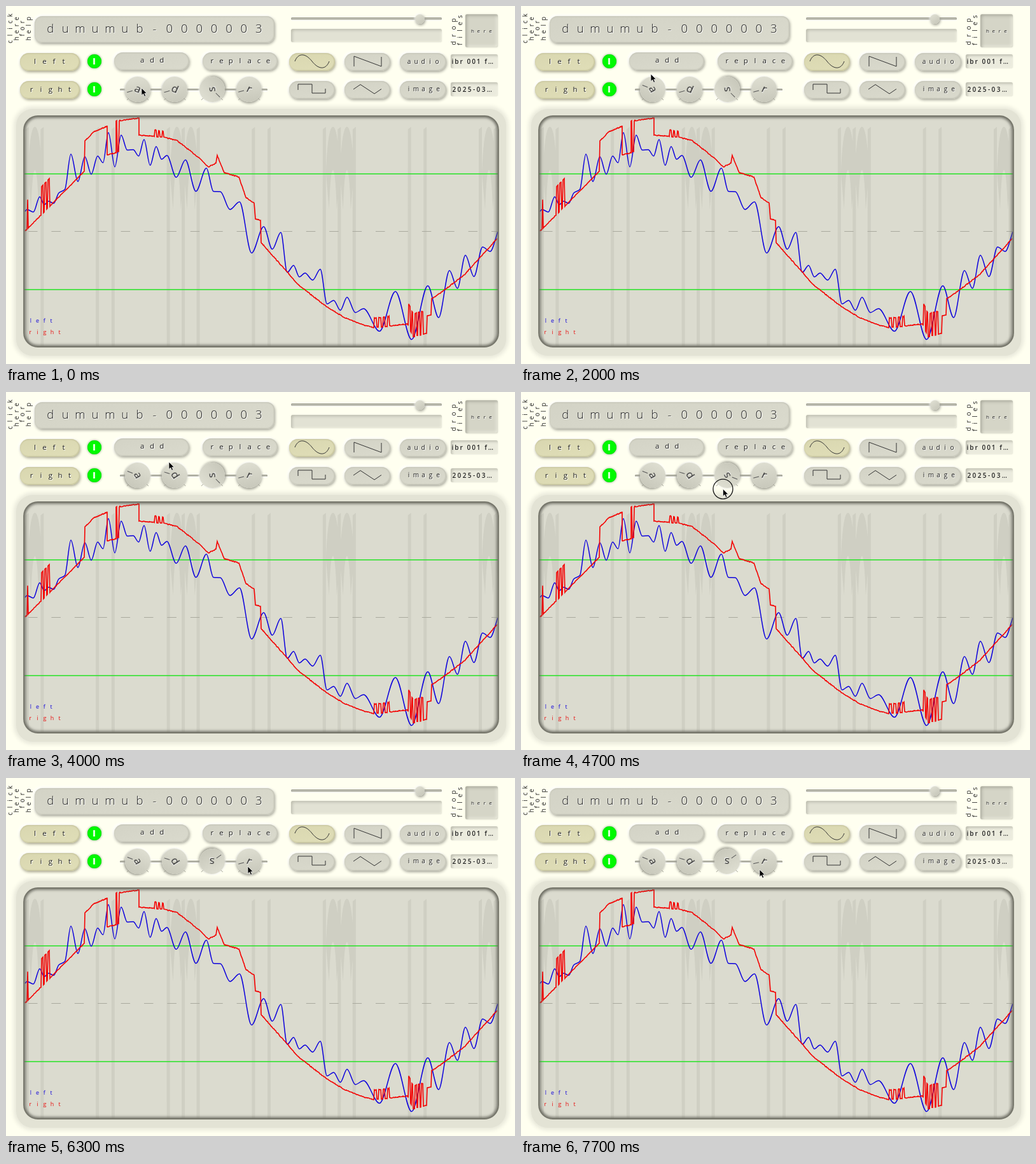
These frames come from a looping animation (800 px wide and 563 px high, 7.8 s). An HTML page:

```html
<!DOCTYPE html>
<html lang="en">
<head>
<meta charset="utf-8">
<title>Envelope panel</title>
<style>
html, body { margin: 0; width: 100%; height: 100%; overflow: hidden; background: #fffff0; }
#stage { position: relative; width: 800px; height: 563px; overflow: hidden; background: #fffff0; }
#stage div { position: absolute; box-sizing: border-box; }
svg { position: absolute; left: 0; top: 0; }
.pill { border-radius: 14px; background: linear-gradient(170deg, #d3d3c6, #dadacd);
  box-shadow: 1px 2px 4px #a5a599, -2px -2px 4px #fff, inset 0 1px 2px #c2c2b5, inset -1px -1px 2px #c0c0b3; }
.on { background: linear-gradient(170deg, #d9d7b0, #e0deb8);
  box-shadow: 1px 2px 4px #a8a68e, -2px -2px 4px #fff, inset 0 1px 2px #c4c19a, inset -1px -1px 2px #c2c099; }
.title { border-radius: 12px; }
.well { border-radius: 3px; background: #e2e2d4; box-shadow: inset 2px 2px 4px #bcbcae, inset -1px -1px 3px #f8f8e9, 0 0 3px #ecece0; }
.deep { background: #d5d5c7; box-shadow: inset 2px 2px 5px #a9a99c, inset -2px -2px 4px #f0f0e2, 0 0 3px #d8d8ca; }
.file { background: #ebebdd; }
.track { border-radius: 2px; background: #c5c5b8; box-shadow: inset 0 1px 2px #8f8f84, 0 1px 2px #fff; }
.thumb, .knob { border-radius: 50%; background: linear-gradient(145deg, #e2e2d5, #c4c4b7);
  box-shadow: 1px 2px 4px #96968b, -1px -1px 3px #fff; }
.led { border-radius: 50%; background: #00fa00; box-shadow: 0 0 3px 1px #bccdb2, inset 0 0 2px #0cc00c; }
.led::after { content: ""; position: absolute; left: 9.5px; top: 6px; width: 3px; height: 10px; background: #d8ffd8; }
.bezel { border-radius: 26px; background: #e3e3d5; box-shadow: 0 0 6px 4px #e9e9db; }
.scope { border-radius: 22px; background: #dbdbcf; }
text { font-family: "Open Sans", "Noto Sans", sans-serif; fill: #222; text-anchor: middle; }
.emboss { filter: drop-shadow(1px 1px .5px #fff); }
</style>
</head>
<body>
<div id="stage"></div>
<script>
const LOOP = 7800, STEP = 100;
const stage = document.getElementById('stage');

function box(cls, x, y, w, h) {
  const d = document.createElement('div');
  d.className = cls;
  d.style.cssText = `left:${x}px;top:${y}px;width:${w}px;height:${h}px`;
  stage.append(d);
  return d;
}

box('pill title', 45, 16, 377, 42);
for (const y of [74, 118]) {
  box('pill on', 22, y, 94, 28);
  box('led', 127.5, y + 2, 22, 22);
  for (let i = 0; i < 3; i++) box(y + i === 74 ? 'pill on' : 'pill', 444.5 + 87.3 * i, y, 72.5, 28);
  box('well file', 699, y + 2, 74, 22);
}
for (const x of [170, 308.5]) box('pill', x, 73, 118, 28);
box('track', 448, 18, 237, 4);
box('thumb', 642.5, 12.5, 15, 15);
box('well', 448, 36, 237, 21);
box('well deep', 722, 13, 51, 52);
box('track', 179, 130, 232, 3);
const knobX = i => 207 + 58.4 * i;
const knobs = [...'adsr'].map((_, i) => box('knob', knobX(i) - 20, 111, 40, 40));
box('bezel', 16, 162, 770, 388);
box('scope', 28, 173, 746, 363);

// Every letter is centred on its own column.
function spaced(str, cx, y, pitch, size, attrs = 'class="emboss"') {
  const xs = [...str].map((_, i) => (cx + (i - (str.length - 1) / 2) * pitch).toFixed(1));
  return `<text x="${xs.join(' ')}" y="${y}" font-size="${size}" ${attrs}>${str}</text>`;
}
const upward = (str, x, cy, pitch) =>
  `<g transform="translate(${x} ${cy}) rotate(-90)">${spaced(str, 0, 0, pitch, 10, '')}</g>`;
const line = (d, color, width) => `<path d="${d}" fill="none" stroke="${color}" stroke-width="${width}"/>`;
const rows = s => s.trim().split(/\s+/).map(p => p.split(',').map(Number));

// Smooth curve through the points without overshoot.
function smooth(p) {
  const slope = p.slice(1).map((q, i) => (q[1] - p[i][1]) / (q[0] - p[i][0]));
  const tan = p.map((_, i) => {
    const a = slope[i - 1] ?? slope[i], b = slope[i] ?? a;
    return a * b <= 0 ? 0 : 2 * a * b / (a + b);
  });
  let d = 'M' + p[0];
  for (let i = 1; i < p.length; i++) {
    const [x0, y0] = p[i - 1], [x1, y1] = p[i], h = (x1 - x0) / 3;
    d += `C${x0 + h},${y0 + h * tan[i - 1]} ${x1 - h},${y1 - h * tan[i]} ${x1},${y1}`;
  }
  return d;
}

// Crests as x, y and the depth of the dip halfway to the next crest.
const crests = rows(`33,320,14 53,300,9 67,307,10 83,294,25 102,233,41 124,237,28 144,236,29 161,199,52
  181,203,12 200,226,18 217,210,35 236,221,13 253,235,31 282,242,43 315,255,18 337,292,20 367,308,61
  405,347,31 432,356,37 452,408,12 470,420,14 494,414,30 515,463,18 536,458,15 562,476,49 612,449,80
  663,440,62 697,416,40 722,392,40 749,379,19 773,355,0`);
const ripple = [[30, 323], ...crests.flatMap(([x, y, dip], i) => {
  const next = crests[i + 1];
  return next ? [[x, y], [(x + next[0]) / 2, (y + next[1]) / 2 + dip]] : [[x, y]];
})];

let seed = 7;
const rand = () => (seed = seed * 16807 % 2147483647) / 2147483647;

// Straight runs, slightly rough, with square teeth: from, to, height, count.
function jagged(p, bursts) {
  let d = 'M' + p[0];
  for (let i = 1; i < p.length; i++) {
    const [x0, y0] = p[i - 1], [x1, y1] = p[i];
    for (let x = x0 + 1; x < x1; x++) {
      const y = y0 + (y1 - y0) * (x - x0) / (x1 - x0);
      const b = bursts.find(([from, to]) => x >= from && x < to);
      const up = b && (x - b[0]) / (b[1] - b[0]) * b[3] % 1 < .5;
      d += `L${x},${y - (up ? b[2] : 0) + rand() * 1.4 - .7}`;
    }
    d += `L${x1},${y1}`;
  }
  return d;
}
const runs = rows(`30,354 123,260 124,212 138,198 159,189 159,234 173,231 173,181 209,176 209,203 245,206
  268,211 305,240 318,253 330,247 332,235 343,262 366,269 377,301 390,310 392,335 400,337 401,372 460,439
  500,470 530,489 560,501 578,506 631,500 640,520 661,515 662,487 668,486 669,460 682,452 720,423 772,366`);
const teeth = [[34, 36, 45, 1], [56, 71, 44, 3], [175, 180, -48, 1], [234, 250, 10, 3],
  [579, 606, 15, 4], [633, 658, 36, 5]];

// Echo columns stand in alternating clusters of three and two.
let ghosts = '';
for (let k = 0; k < 7; k++) {
  const mid = 33.4 + 122.6 * k, trio = k % 2 === 0;
  for (const o of trio ? [-23.5, 0, 23.5] : [-12.3, 12.3])
    ghosts += `M${mid + o - 2.5},194l5,-4V535h-5Z`;
  if (trio) for (const x of [mid - 10, mid + 12])
    ghosts += `M${x - 11},262q3,-72 11,-72t11,72l-5,58q-2,-62 -6,-62t-6,62Z`;
}

const dial = (name, i) => {
  const x = knobX(i);
  return `<path d="M${x - 14},145l-3,3M${x + 14},145l3,3" stroke="#a5a598"/>
    <g class="dial"><path d="M-17.5,0H-8.5" transform="rotate(-40)" stroke="#555"/>
    <text y="5" font-size="17" class="emboss">${name}</text></g>`;
};

const icons = 'M454,87C459,74 470,73 481,87S503,100 508,87M547,95V79L590,95V80' +
  'M459,132V123H481V137H502V130M546,131L557,123.5L579,138L590,130.5';
const rim = attrs => `<rect x="28" y="173" width="746" height="363" rx="22" ${attrs}/>`;

stage.insertAdjacentHTML('beforeend', `<svg width="800" height="563">
  <defs>
    <clipPath id="glass">${rim('')}</clipPath>
    <filter id="soft"><feGaussianBlur stdDeviation="2.2"/></filter>
  </defs>
  <g clip-path="url(#glass)">
    <path d="${ghosts}" fill="#cfcfc3"/>
    <path d="M35,354.5H772" stroke="#a9a99e" stroke-dasharray="14.5 21.9"/>
    ${line('M28,264H774M28,446H774', '#25e325', 1.7)}
    ${line(smooth(ripple), '#0c00dc', 1.5)}
    ${line(jagged(runs, teeth), '#f40000', 1.6)}
    ${rim('fill="none" stroke="#65655b" stroke-width="5" filter="url(#soft)"')}
  </g>
  ${rim('fill="none" stroke="#77776c" stroke-width="1.8"')}
  ${spaced('left', 55, 498, 10.8, 9, 'style="fill:#1408d8"')}
  ${spaced('right', 61, 516, 11.5, 9, 'style="fill:#e81010"')}
  ${spaced('dumumub-0000003', 233.5, 42, 23.4, 18.5, 'class="emboss" font-weight="300"')}
  ${spaced('left', 68, 90.5, 15, 11.5)}
  ${spaced('right', 70, 134.5, 15, 11.5)}
  ${spaced('add', 229.5, 89, 15.3, 11.5)}
  ${spaced('replace', 368, 89.5, 14.7, 11.5)}
  ${spaced('audio', 655.5, 90.5, 11, 10)}
  ${spaced('image', 656, 134, 11.5, 10)}
  ${spaced('here', 747.5, 42, 9.4, 8)}
  <g font-size="10" font-weight="600" letter-spacing="2">
    <text x="700.5" y="91" style="text-anchor:start">ibr 001 f…</text>
    <text x="701.5" y="134.5" style="text-anchor:start" letter-spacing="2.4">2025-03…</text>
  </g>
  ${['click', 'here', 'for', 'help'].map((w, i) => upward(w, 10 + 9.6 * i, 35.5, 10.4)).join('')}
  ${upward('drop', 707, 40.5, 12)}${upward('files', 717, 38.5, 10.8)}
  ${line(icons, '#333', 1)}
  ${[...'adsr'].map(dial).join('')}
  <g id="pointer">
    <circle r="15.5" fill="none" stroke="#151515" stroke-width="1.3"/>
    <path d="M0,0V11.5L2.7,9L4.6,13.3L6.6,12.4L4.8,8.3H8.3Z" fill="#000" stroke="#fff" stroke-width=".7"/>
  </g>
</svg>`);

// One drag per dial: press, turn and release times, pointer places, dial angles.
const drags = [
  { when: [300, 1250, 1900], path: [[213, 129], [207, 47], [204, 107]], spin: [24, 138, 62] },
  { when: [2500, 3200, 3800], path: [[260, 131], [258, 82], [256, 110]], spin: [24, 92, 57] },
  { when: [4400, 5250, 5600], path: [[318, 130], [316, 209], [319, 192]], spin: [265, 180, 185] },
  { when: [6600, 7000, 7600], path: [[380, 139], [378, 97], [375, 144]], spin: [26, 72, 28] }
];
const ease = u => { u = Math.min(1, Math.max(0, u)); return u * u * (3 - 2 * u); };
const mix = (a, b, u) => a + (b - a) * u;

function through([t0, t1, t2], [a, b, c], t) {
  return t < t1 ? mix(a, b, ease((t - t0) / (t1 - t0))) : mix(b, c, ease((t - t1) / (t2 - t1)));
}

function place(t) {
  const i = Math.max(0, drags.findLastIndex(d => t >= d.when[0]));
  const { when, path } = drags[i], next = drags[i + 1];
  const glide = ease((t - when[2] - 200) / 400);
  return [0, 1].map(k => {
    const v = through(when, path.map(p => p[k]), t);
    return next ? mix(v, next.path[0][k], glide) : v;
  });
}

const pointer = document.getElementById('pointer');
const ring = pointer.querySelector('circle');
const dials = document.querySelectorAll('.dial');

function draw() {
  const t = Math.floor(performance.now() % LOOP / STEP) * STEP;
  pointer.setAttribute('transform', `translate(${place(t)})`);
  ring.style.display = drags.some(({ when }) => t >= when[0] && t < when[2]) ? '' : 'none';
  drags.forEach(({ when, spin }, i) => {
    const turn = through(when, spin, t);
    dials[i].setAttribute('transform', `translate(${knobX(i)} 131) rotate(${turn})`);
    knobs[i].style.transform = `rotate(${turn}deg)`;
  });
  requestAnimationFrame(draw);
}
draw();
</script>
</body>
</html>
```
